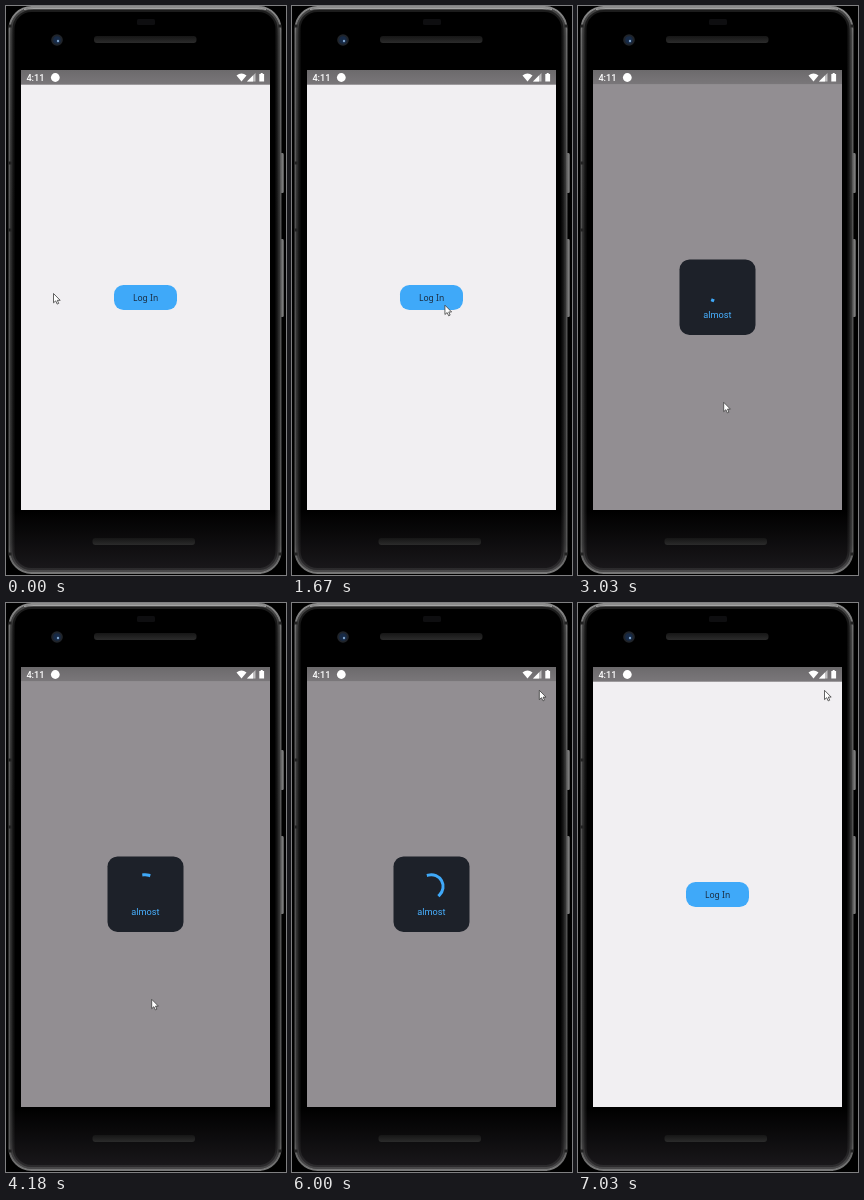
Animation, 280 px wide and 569 px high, one loop 7.06 s. Source, as an HTML page:

```html
<!DOCTYPE html>
<html lang="en">
<head>
<meta charset="utf-8">
<title>Login loader</title>
<style>
  html, body { margin: 0; width: 100%; height: 100%; overflow: hidden; background: #000; }
  svg { display: block; width: 280px; height: 569px; }
  text { font-family: Roboto, sans-serif; font-size: 9.2px; }
  .mid { text-anchor: middle; }
</style>
</head>
<body>
<svg viewBox="0 0 280 569">
  <defs>
    <linearGradient id="rim" x1="0" y1="0" x2="0" y2="1">
      <stop offset="0" stop-color="#8c8c8c"/>
      <stop offset=".05" stop-color="#6a6a6a"/>
      <stop offset=".4" stop-color="#505050"/>
      <stop offset=".95" stop-color="#545454"/>
      <stop offset="1" stop-color="#777"/>
    </linearGradient>
    <linearGradient id="body" x1="0" y1="0" x2="0" y2="1">
      <stop offset=".89" stop-color="#000"/>
      <stop offset="1" stop-color="#1b191c"/>
    </linearGradient>
    <linearGradient id="key">
      <stop offset="0" stop-color="#2c2c2c"/>
      <stop offset=".6" stop-color="#8a8a8a"/>
      <stop offset="1" stop-color="#4a4a4a"/>
    </linearGradient>
    <linearGradient id="bar" x1="0" y1="0" x2="0" y2="1">
      <stop offset="0" stop-color="#6c6a6c"/>
      <stop offset="1" stop-color="#7a777a"/>
    </linearGradient>
    <linearGradient id="slot" x1="0" y1="0" x2="0" y2="1">
      <stop offset="0" stop-color="#161616"/>
      <stop offset="1" stop-color="#2b2b2b"/>
    </linearGradient>
  </defs>

  <!-- phone body: a rim that fades inwards -->
  <rect width="280" height="569"/>
  <rect x="273" y="147" width="5" height="40" rx="1.5" fill="url(#key)"/>
  <rect x="273" y="233" width="5" height="78" rx="1.5" fill="url(#key)"/>
  <g stroke-width="2" fill="none">
    <rect x="3.5" y="1" width="271" height="566" rx="22" fill="url(#body)" stroke="url(#rim)"/>
    <rect x="5.500" y="3" width="267" height="562" rx="20" stroke="url(#rim)" stroke-opacity=".5"/>
    <rect x="7.500" y="5" width="263" height="558" rx="18" stroke="url(#rim)" stroke-opacity=".2"/>
  </g>
  <path d="M18 3.500Q22 2.500 28 2.500H250Q256 2.500 260 3.500" fill="none" stroke="#a5a5a5" stroke-width="1.2"/>
  <path d="M2.500 20h3M2.500 157h3M2.500 224h3M272.500 20h3M2.500 548h3M272.500 548h3" stroke="#222" stroke-width="3"/>
  <rect x="131" y="13" width="18" height="6" rx="1.5" fill="#0e0e10"/>
  <rect x="88" y="30" width="102.5" height="7" rx="3" fill="url(#slot)"/>
  <rect x="86.5" y="532" width="102.5" height="7" rx="3" fill="url(#slot)"/>
  <circle cx="51" cy="34" r="5.8" fill="#20242a"/>
  <circle cx="51" cy="34" r="3.8" fill="#172a46"/>
  <circle cx="52" cy="35" r="1.2" fill="#7fa3cc"/>

  <!-- login screen -->
  <rect x="15" y="64" width="249" height="440" fill="#f1eff2"/>
  <rect x="108" y="279" width="63" height="25" rx="9.5" fill="#3fa9f9"/>
  <text class="mid" x="139.6" y="295" fill="#1b2c3f" style="font-family:'Noto Sans','Open Sans',sans-serif;font-size:8.5px">Log In</text>

  <!-- loading dialog -->
  <g id="dialog">
    <rect x="15" y="78.5" width="249" height="425.5" fill="#928e92"/>
    <rect x="101.5" y="253.5" width="76" height="75.5" rx="10" fill="#1d2129"/>
    <path id="arc" fill="none" stroke="#3fa9f9" stroke-width="3" stroke-linecap="square"/>
    <text id="label" class="mid" x="139.4" y="312.2" fill="#48b0ff"></text>
  </g>

  <!-- status bar -->
  <rect x="15" y="64" width="249" height="14.7" fill="url(#bar)"/>
  <g fill="#fff">
    <text x="20.4" y="74.8" font-weight="500">4:11</text>
    <circle cx="49.3" cy="71.5" r="4.4"/>
    <path d="M230.5 69.400Q235.500 65.600 240.500 69.400L235.500 75.500Z"/>
    <path d="M249.500 67V75.500H241Z" opacity=".55"/>
    <path d="M247 69.500V75.500H241Z"/>
    <path d="M254.700 67h2v.9h1.400v7.600h-4.800v-7.600h1.400Z"/>
  </g>

  <path id="cursor" d="M0 0V9.300L2.200 7.400L3.700 10.600L5.200 9.900L3.800 6.800H6.700Z" fill="#fff" stroke="#3c3c3c" stroke-width=".8" stroke-linejoin="round"/>
</svg>
<script>
const LOOP = 7060, OPEN = 1730, CLOSE = 6940, SWAP = 2500;
const SPIN_START = 1752, CYCLE = 1333, TURN = 4444;
const CX = 139.3, CY = 283.5, R = 11.8;

// time, x, y of the pointer tip
const path = [
  [0, 47.5, 287.5], [120, 47.5, 287.5], [640, 188, 287], [880, 172.3, 290],
  [1350, 152, 294], [1600, 152, 296], [1790, 154.5, 304.5], [2250, 156, 308],
  [2550, 174, 350], [2900, 145.7, 396.3], [5200, 145.7, 396.3],
  [5330, 199, 218.5], [5520, 247.3, 87.3], [6750, 247.3, 87.3], [7000, 246.5, 87.3]
];

const $ = id => document.getElementById(id);
const dialog = $('dialog'), arc = $('arc'), label = $('label'), cursor = $('cursor');

const cubic = (a, b, c, d, s) => {
  const r = 1 - s;
  return a * r * r * r + 3 * b * r * r * s + 3 * c * r * s * s + d * s * s * s;
};

// y rises 0..1 with flat ends while x follows the given control values
function ease(x, a, b, c, d) {
  if (x <= a) return 0;
  if (x >= d) return 1;
  let lo = 0, hi = 1;
  for (let i = 0; i < 24; i++) {
    const s = (lo + hi) / 2;
    if (cubic(a, b, c, d, s) < x) lo = s; else hi = s;
  }
  return cubic(0, 0, 1, 1, lo);
}

function pointer(t) {
  const i = path.findIndex(p => p[0] > t);
  if (i < 0) return path[path.length - 1].slice(1);
  const a = path[i - 1], b = path[i], u = (t - a[0]) / (b[0] - a[0]);
  return [1, 2].map(k => a[k] + (b[k] - a[k]) * u);
}

function point(deg) {
  const a = deg * Math.PI / 180;
  return `${(CX + R * Math.sin(a)).toFixed(3)} ${(CY - R * Math.cos(a)).toFixed(3)}`;
}

function spinner(t) {
  const dt = Math.max(0, t - SPIN_START), p = dt / CYCLE % 1;
  const base = dt / TURN * 720 + p * 90;
  const from = base + 270 * ease(p, 0.5, 0.7, 0.6, 1);
  const to = Math.max(from + 1, base + 270 * ease(p, 0, 0.2, 0.1, 0.5));
  return `M${point(from)}A${R} ${R} 0 ${to - from > 180 ? 1 : 0} 1 ${point(to)}`;
}

function draw(t) {
  const open = t >= OPEN && t < CLOSE;
  dialog.style.display = open ? '' : 'none';
  if (open) {
    arc.setAttribute('d', spinner(t));
    label.textContent = t < SWAP ? 'Loading' : 'almost';
  }
  cursor.setAttribute('transform', `translate(${pointer(t)})`);
}

const start = performance.now();
function tick() {
  draw((performance.now() - start) % LOOP);
  requestAnimationFrame(tick);
}
tick();
</script>
</body>
</html>
```
